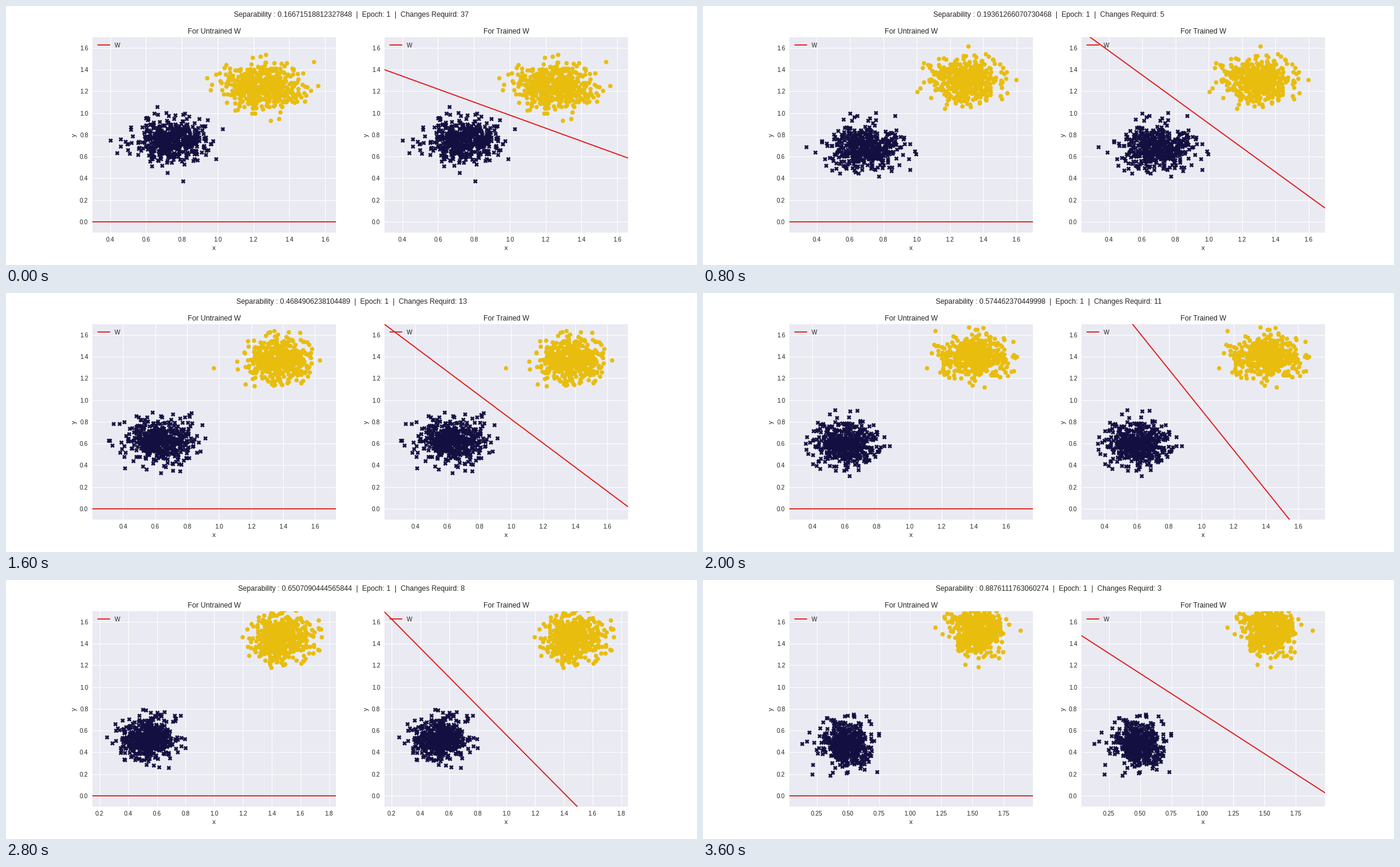
Write a matplotlib script that moves like this. It is 1152 px wide and 432 px high and loops after 4000 ms.

```python
import numpy as np
import matplotlib.pyplot as plt
from matplotlib.animation import FuncAnimation

plt.style.use("seaborn-v0_8")
plt.rcParams["font.family"] = "Liberation Sans"

NAVY, GOLD, RED = "#130f40", "#e8bd0e", "#e31414"
COUNT, SIGMA, MARGIN = 500, 0.1, 0.1

# separability, changes, x limits, trained line at both x limits
STEPS = [
    ("0.16671518812327848", 37, (0.3005, 1.6591), (1.400, 0.587)),
    ("0.2023360316079888", 24, (0.3027, 1.7515), (1.536, 0.300)),
    ("0.19361266070730468", 5, (0.236, 1.698), (1.757, 0.127)),
    ("0.3316045271938264", 9, (0.25, 1.73), (1.73, 0.07)),
    ("0.4684906238104489", 13, (0.207, 1.729), (1.698, 0.019)),
    ("0.574462370449998", 11, (0.257, 1.766), (2.284, -0.505)),
    ("0.6125736418205917", 9, (0.18, 1.817), (1.99, -0.54)),
    ("0.6507090444565844", 8, (0.15, 1.847), (1.692, -0.57)),
    ("0.7690462815730428", 5, (0.10, 1.90), (1.58, -0.27)),
    ("0.8876111763060274", 3, (0.03, 1.984), (1.474, 0.028)),
]


def cloud(rng, mean, edge, xlim):
    """Round Gaussian cloud whose outermost point lies at x = edge."""
    points = rng.normal(mean, SIGMA, (COUNT, 2))
    x = points[:, 0]
    inside = (x > xlim[0] + MARGIN) & (x < xlim[1] - MARGIN)
    return np.vstack([points[inside], [edge, mean]])


def draw_panel(ax, title, low, high, xlim, line):
    ax.clear()
    ax.scatter(*low.T, color=NAVY, marker="X", s=49)
    ax.scatter(*high.T, color=GOLD, marker="o", s=49)
    ax.plot(xlim, line, color=RED, label="W")
    ax.set(title=title, xlabel="x", ylabel="y", xlim=xlim, ylim=(-0.1, 1.7))
    ax.legend(loc="upper left")


fig, (left, right) = plt.subplots(1, 2, figsize=(16, 6), dpi=72)
fig.subplots_adjust(left=0.125, right=0.9, bottom=0.125, top=0.88, wspace=0.2)
heading = fig.suptitle("", fontsize=12)


def update(i):
    score, changes, xlim, line = STEPS[i]
    rng = np.random.default_rng(i)
    # the two clouds drift apart by a fixed step
    low = cloud(rng, 0.75 - 0.03 * i, xlim[0] + MARGIN, xlim)
    high = cloud(rng, 1.25 + 0.03 * i, xlim[1] - MARGIN, xlim)
    heading.set_text(f"Separability : {score}  |  Epoch: 1  |  "
                     f"Changes Requird: {changes}")
    draw_panel(left, "For Untrained W", low, high, xlim, (0, 0))
    draw_panel(right, "For Trained W", low, high, xlim, line)


anim = FuncAnimation(fig, update, frames=len(STEPS), interval=400,
                     init_func=lambda: None, repeat=True)
plt.show()
```
